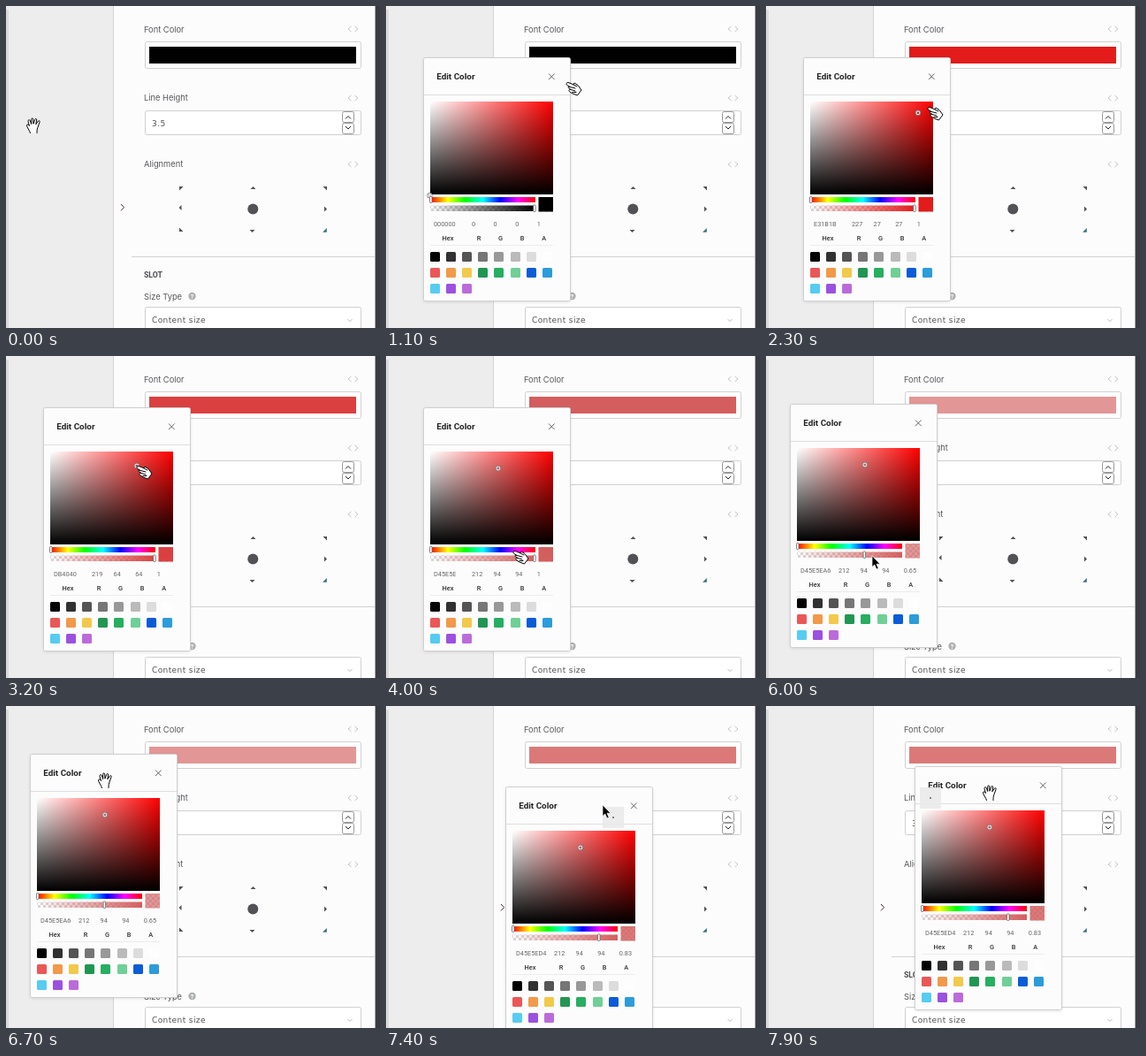
Animation, 423 px wide and 364 px high, one loop 8 s. Source, as an HTML page:

```html
<!DOCTYPE html>
<html lang="en">
<head>
<meta charset="utf-8">
<title>Edit Color</title>
<style>
  html, body { margin: 0; width: 100%; height: 100%; overflow: hidden; background: #ededed; }
  svg { display: block; width: 423px; height: 364px; font-family: Roboto, sans-serif; }
  .label { font: 9.3px Inter, sans-serif; fill: #58585c; }
  .input { font: 9px "DejaVu Sans", sans-serif; letter-spacing: .4px; fill: #505053; }
  .box { fill: #fff; stroke: #d0d0d0; }
  .line { fill: none; stroke-width: 1; }
  .value { font-size: 7.3px; fill: #666; }
  .channel { font-size: 7.4px; font-weight: 500; fill: #333; text-anchor: middle; }
</style>
</head>
<body>
<svg viewBox="0 0 423 364">
  <defs>
    <linearGradient id="white"><stop stop-color="#fff"/><stop offset="1" stop-color="#f00"/></linearGradient>
    <linearGradient id="black" x2="0" y2="1"><stop stop-opacity="0"/><stop offset="1"/></linearGradient>
    <linearGradient id="hues"></linearGradient>
    <linearGradient id="fade">
      <stop class="tint" stop-opacity="0"/><stop class="tint" offset="1"/>
    </linearGradient>
    <pattern id="checker" width="6" height="6" patternUnits="userSpaceOnUse">
      <path fill="#fff" d="M0 0h6v6H0z"/><path fill="#d8d8d8" d="M0 0h3v3H0zM3 3h3v3H3z"/>
    </pattern>
    <filter id="shadow" x="-10%" y="-10%" width="120%" height="120%">
      <feDropShadow dx="0" dy="1" stdDeviation="1.5" flood-opacity=".1"/>
    </filter>
  </defs>

  <path fill="#dadada" d="M0 4h3v360H0z"/>
  <path fill="#fcfcfc" d="M122 0h295v364H122z"/>
  <path fill="#d2d2d2" d="M121 0h1v364h-1zM142 283h275v1H142z"/>
  <path fill="#a5a5aa" d="M417 0h1v364h-1z"/>
  <path fill="#3a3b42" d="M418 0h5v364h-5z"/>
  <path class="line" stroke="#4a2a38" stroke-width="1.5" d="M130 224l3.500 3.700-3.500 3.700"/>

  <g class="label">
    <text x="156" y="29.500">Font Color</text>
    <text x="156" y="107">Line Height</text>
    <text x="156" y="182">Alignment</text>
    <text x="156" y="332">Size Type</text>
  </g>
  <text x="156" y="307" font-size="8.700" font-weight="700" fill="#4c4c4f">SLOT</text>
  <g id="codes" class="line" stroke="#c6c6c9"></g>

  <rect class="box" x="157.500" y="40.500" width="244" height="30" rx="2"/>
  <rect id="field" x="162" y="46" width="234" height="19"/>

  <rect class="box" x="157.500" y="118.500" width="244" height="27" rx="2"/>
  <text class="input" x="165" y="136">3.5</text>
  <g fill="#fff" stroke="#98989c">
    <rect x="380.500" y="119.500" width="13" height="12" rx="2"/>
    <rect x="380.500" y="132.500" width="13" height="12" rx="2"/>
  </g>
  <path class="line" stroke="#222" stroke-width="1.400" d="M384 127.500l3-3 3 3M384 136l3 3 3-3"/>

  <g fill="#525256">
    <circle cx="279.300" cy="229.500" r="6"/>
    <path d="M276.500 207l3-3 3 3zM275.500 253h6l-3 3zM198.500 225v6l-3-3zM360 226.500v6l3-3z"/>
    <path d="M196 204h4.500l-4.500 4.500zM358.500 204h4.500v4.500zM196 250.500l4.500 4.500H196z"/>
    <path fill="#3a6f80" d="M362.800 251v4.700h-4.700z"/>
  </g>

  <circle cx="210.500" cy="328" r="4.200" fill="#aeb0b2"/>
  <text x="210.500" y="330.700" font-size="7" font-weight="700" fill="#fff" text-anchor="middle">?</text>
  <rect class="box" x="157.500" y="340.500" width="244" height="30" rx="2"/>
  <text class="input" x="165" y="358">Content size</text>
  <path class="line" stroke="#bbb" d="M386.500 354l2.500 2.500 2.500-2.500"/>

  <g id="dialog">
    <rect x=".5" y=".5" width="166" height="275" rx="2" fill="#fcfcfc" stroke="#cfcfcf" filter="url(#shadow)"/>
    <path fill="#dedede" d="M1 42h165v1H1z"/>
    <path fill="#ececec" d="M8 212h139v1H8z"/>
    <text x="15.200" y="25.200" font-size="9.900" font-weight="700" fill="#222">Edit Color</text>
    <path class="line" stroke="#666" d="M142 18.500l6.600 6.600m0-6.600l-6.600 6.600"/>
    <rect x="8" y="50" width="139" height="105" fill="url(#white)"/>
    <rect x="8" y="50" width="139" height="105" fill="url(#black)"/>
    <g id="marker" fill="none">
      <rect x="-2" y="-2" width="4" height="4" rx="1" stroke="#777" stroke-width="2"/>
      <rect x="-1.800" y="-1.800" width="3.600" height="3.600" rx="1" stroke="#fff"/>
    </g>
    <rect x="8" y="158" width="119" height="6" fill="url(#hues)"/>
    <rect x="8" y="167.500" width="119" height="6.500" fill="url(#checker)"/>
    <rect x="8" y="167.500" width="119" height="6.500" fill="url(#fade)"/>
    <g fill="#fff" stroke="#666" stroke-width=".8">
      <rect x="7.500" y="157.500" width="2.500" height="7" rx=".7"/>
      <rect id="thumb" y="167" width="2.500" height="7.500" rx=".7"/>
    </g>
    <rect x="130.500" y="158" width="16.500" height="16.500" fill="url(#checker)"/>
    <rect id="preview" x="130.500" y="158" width="16.500" height="16.500"/>
    <g id="values"></g>
    <g id="swatches"></g>
  </g>

  <g id="ghost">
    <rect id="ghostBox" fill="#eaeaea" fill-opacity=".9"/>
    <rect id="ghostMark"/>
  </g>
  <g id="cursor" fill="#fff" stroke="#000" stroke-linejoin="round" stroke-linecap="round">
    <path id="hand"
      d="M-3.500 8.500C-4 6-7.500 2-7.500 0-7.500-1.500-5.500-1.500-4.500.5L-6-4.500C-6.300-6.500-4.300-7-3.700-5.300L-2.300-1.500-2.300-6.800C-2.300-8.500-.4-8.500-.3-6.800L0-1.800 1.700-6.600C2.300-8.200 4.100-7.500 3.700-6L2.800-1.200 5.400-4.800C6.500-6 7.700-5 7-3.700L4.800 2.500C4 5 4 6.500 4 8.500"/>
    <g id="point">
      <path d="M0 2C0 .5 1.500 0 3 .8L8 2.800 9 1 13 3.500 17 9 12.500 15 7 13 4 11C2 10 3 8 5 8.500L3 7C1 6 2 5 4 5.500L1 3.600Z"/>
      <path d="M4 5.500L10 7M5 8.500l5 1.500M8 3l4 2M7 11.500h4"/>
    </g>
    <path id="arrow" fill="#000" stroke="#fff" stroke-width=".7"
      d="M0 0V12.500L2.800 10 5 15 7.200 14 5 9.200H8.800Z"/>
  </g>
</svg>

<script>
const LOOP = 8000, STEP = 100;
const $ = id => document.getElementById(id);

function add(parent, tag, attrs, text = '') {
  const node = document.createElementNS('http://www.w3.org/2000/svg', tag);
  set(node, attrs);
  node.textContent = text;
  return parent.appendChild(node);
}
function set(node, attrs) {
  for (const key in attrs) node.setAttribute(key, attrs[key]);
}
function show(id, visible) {
  set($(id), { visibility: visible ? 'visible' : 'hidden' });
}
const place = (id, [x, y]) => set($(id), { transform: `translate(${x} ${y})` });
const shift = ([x, y], dx, dy) => [x + dx, y + dy];
const within = (t, start, end) => t >= start && t < end;
const hex = n => Math.round(n).toString(16).toUpperCase().padStart(2, '0');

const easeOut = k => 1 - (1 - k) ** 2;

// Each leg [start, end, target] eases on from wherever the previous one leads.
function glide(t, from, ...legs) {
  return legs.reduce((now, [start, end, target]) => {
    const k = easeOut(Math.min(1, Math.max(0, (t - start) / (end - start))));
    return now.map((v, i) => v + (target[i] - v) * k);
  }, from);
}

for (let i = 0; i <= 6; i++)
  add($('hues'), 'stop', { offset: i / 6, 'stop-color': `hsl(${i * 60},100%,50%)` });
for (const y of [26, 104, 179])
  add($('codes'), 'path', { d: `M390.500 ${y - 3}l-3.500 3 3.500 3M394.500 ${y - 3}l3.500 3-3.500 3` });

const values = ['Hex', 'R', 'G', 'B', 'A'].map((name, i) => {
  const middle = i ? 38.4 + 24.6 * i : 28;
  add($('values'), 'text', { class: 'channel', x: middle, y: 207 }, name);
  return add($('values'), 'text', { class: 'value', x: middle - (i ? 8 : 16), y: 191 });
});

const grey = i => `hsl(0,0%,${i && 6 + 13.4 * i}%)`;
const palette = [...Array.from({ length: 8 }, (_, i) => grey(i)),
  '#eb5757', '#f2994a', '#f2c94c', '#219653', '#27ae60', '#6fcf97', '#0b5cd8', '#2d9cdb',
  '#56ccf2', '#9b51e0', '#bb6bd9'];
palette.forEach((fill, i) => add($('swatches'), 'rect', {
  x: 8 + Math.round(i % 8 * 18.1), y: 220 + Math.floor(i / 8) * 18, width: 11, height: 11, rx: 1.5, fill
}));

function paint([r, g], alpha) {
  const color = `rgb(${r},${g},${g})`;
  for (const id of ['field', 'preview']) set($(id), { fill: color, 'fill-opacity': alpha });
  for (const stop of document.querySelectorAll('.tint')) set(stop, { 'stop-color': color });
  const code = hex(r) + hex(g) + hex(g) + (alpha < 1 ? hex(alpha * 255) : '');
  [code, r, g, g, alpha].forEach((v, i) => values[i].textContent = v);
}

function drawGhost(t, dialog, cursor) {
  const early = within(t, 5100, 5400), late = t >= 7800;
  show('ghost', early || late || within(t, 7300, 7500));
  const [x, y] = late ? shift(dialog, 6, 24) : shift(cursor, 0, 2);
  const size = early ? 30 : 24, mark = early ? 13 : 1.5, inset = (size - mark) / 2;
  set($('ghostBox'), { x, y, width: size, height: size });
  set($('ghostMark'), { x: x + inset, y: y + inset, width: mark, height: mark, fill: early ? '#cfcfcf' : '#333' });
}

function draw(t) {
  const dialog = glide(t, [42, 58], [4800, 5300, [27, 54]], [6700, 7400, [135, 91]], [7400, 7600, [168, 68]])
    .map(Math.round);
  const tone = t < 1700 ? [0, 0] : glide(t, [227, 27], [3000, 3600, [212, 94]]).map(Math.round);
  const fading = glide(t, [1], [4000, 5200, [.7]], [5500, 6100, [.65]])[0];
  const alpha = t < 6800 ? Math.round(fading * 100) / 100 : .83;

  const [r, g] = tone, saturation = r && 1 - g / r;
  const marker = [7.5 + saturation * 139, 51.3 + (1 - r / 255) * 105];
  const thumb = 7 + alpha * 119;

  show('dialog', t >= 900);
  place('dialog', dialog);
  place('marker', marker);
  set($('thumb'), { x: thumb - 1.25 });
  paint(tone, alpha);

  // Targets are live, so the pointer keeps hold of whatever it drags.
  const onMarker = shift(dialog, ...marker), grip = shift(dialog, 85, 30);
  const cursor = glide(t, [31, 135],
    [100, 700, [228, 60]],
    [900, 1700, t < 1700 ? [172, 120] : onMarker],
    [1800, 2000, [148, 191]], [2000, 2300, [183, 114]],
    [2500, 2700, [189, 60]], [2700, 2900, onMarker],
    [3600, 4000, [144, 220]], [4000, 4400, shift(dialog, thumb + 9, 172)],
    [6200, 6700, grip], [7200, 7400, shift(dialog, 110, 21)], [7400, 7600, grip]).map(Math.round);
  place('cursor', cursor);

  const kind = within(t, 4900, 6300) || within(t, 7300, 7500) ? 'arrow' : within(t, 700, 4900) ? 'point' : 'hand';
  for (const id of ['hand', 'point', 'arrow']) show(id, id === kind);
  drawGhost(t, dialog, cursor);
}

const start = performance.now();
function tick() {
  const t = (performance.now() - start) % LOOP;
  draw(Math.floor(t / STEP) * STEP);
  requestAnimationFrame(tick);
}
tick();
</script>
</body>
</html>
```
